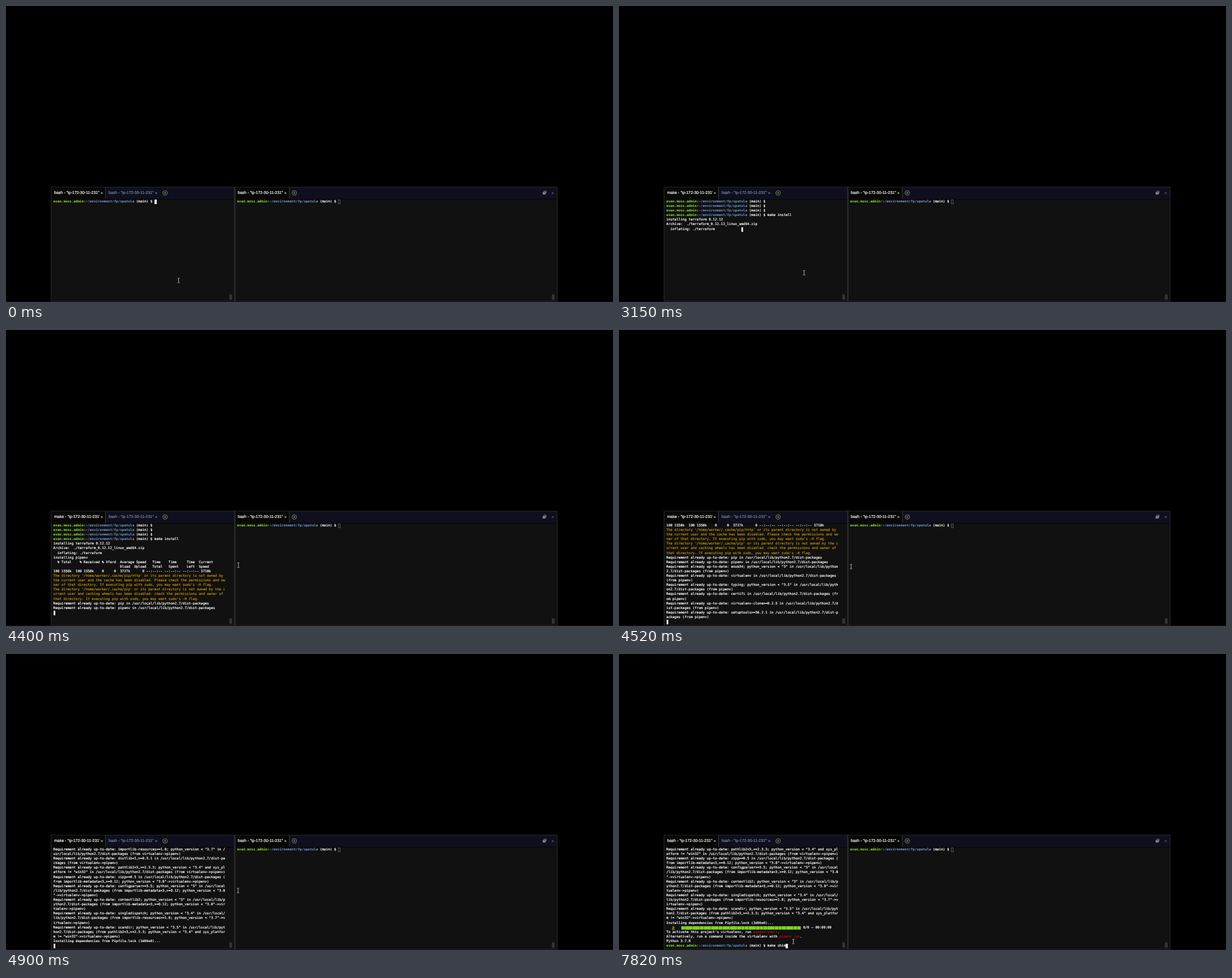
An HTML page that plays this animation: 1071 by 523 pixels, repeating every 8 s.

```html
<!DOCTYPE html>
<html lang="en">
<head>
<meta charset="utf-8">
<title>Terminal session</title>
<style>
  html, body { margin: 0; width: 100%; height: 100%; overflow: hidden; background: #000; }
  #stage { position: absolute; left: 0; top: 0; width: 1071px; height: 523px; overflow: hidden; text-rendering: geometricPrecision; }
  svg { position: absolute; left: 0; top: 0; }
  .tab { font: 7.03px "Liberation Sans", Arial, sans-serif; fill: #fff; stroke: #fff; stroke-width: .2px; }
  .idle { fill: #77899a; stroke: #77899a; }
  .stroke { fill: none; stroke-width: .9; }
  .term {
    position: absolute; top: 342px; margin: 0; color: #fff;
    font: 5.93px/8.095px "DejaVu Sans Mono", monospace;
    -webkit-text-stroke: .22px currentColor;
  }
  .row { position: relative; height: 8.095px; white-space: pre; }
  .user, .path, .bold { font-weight: bold; -webkit-text-stroke-width: 0; }
  .user { color: #8ae234; }
  .path { color: #6f9bdc; }
  .warn { color: #bd8a0a; }
  .red { color: #c00808; }
  .cursor { position: absolute; top: .4px; width: 3.6px; height: 7.6px; background: #f0f0f0; }
  .cursor.hollow { width: 4px; height: 8px; top: 0; background: none; border: 1px solid #555; box-sizing: border-box; }
  .bar {
    position: absolute; left: 26.4px; top: 1px; width: 211.2px; height: 6.4px;
    background: repeating-linear-gradient(90deg, #7ad321 0 5.9px, #4f8a1c 5.9px 6.6px);
  }
  .count { position: absolute; left: 241.4px; }
  .snake { left: 8.5px; top: .5px; }
</style>
</head>
<body>
<div id="stage">
  <svg width="1071" height="523" viewBox="0 0 1071 523">
    <defs>
      <clipPath id="titleClip"><rect x="85" y="322" width="80.2" height="16"/></clipPath>
      <linearGradient id="shade" x2="0" y2="1"><stop stop-color="#060606"/><stop offset="1" stop-color="#111"/></linearGradient>
      <path id="close" class="stroke" d="M-1.6-1.6 1.6 1.6M1.6-1.6-1.6 1.6"/>
      <g id="plus" class="stroke" stroke="#8f9f55"><circle r="4"/><path d="M-2 0H2M0-2V2"/></g>
    </defs>
    <rect x="79" y="319.5" width="894" height="203" fill="#2b2c30"/>
    <rect x="80" y="320.5" width="892" height="20" fill="#0f0f20"/>
    <rect x="80" y="340.5" width="892" height="181" fill="#111"/>
    <rect x="80" y="340.5" width="892" height="3.5" fill="url(#shade)"/>
    <rect x="80" y="320.5" width="95" height="20.5" fill="#080907"/>
    <rect x="405" y="320.5" width="94.5" height="20.5" fill="#080907"/>
    <path d="M175.5 320V340.5M500 320V340.5" stroke="#3a3d35" stroke-width="1"/>
    <rect id="splitter" x="402.5" y="319.5" width="2.5" height="202" fill="#2b2b2b"/>
    <rect y="522" width="1071" height="1" fill="#180d10"/>
    <g fill="#333"><rect x="394" y="509.5" width="5" height="9.5" rx="1"/><rect x="963" y="509.5" width="5" height="9.5" rx="1"/></g>
    <text id="title" class="tab" x="85" y="332.4" clip-path="url(#titleClip)"></text>
    <text class="tab idle" x="181" y="332.4">bash - "ip-172-30-11-231"</text>
    <text class="tab" x="409" y="332.4">bash - "ip-172-30-11-231"</text>
    <use href="#close" x="169" y="330.5" stroke="#ddd"/>
    <use href="#close" x="265" y="330.5" stroke="#8a949c"/>
    <use href="#close" x="493" y="330.5" stroke="#ddd"/>
    <use href="#close" x="964.8" y="330.5" stroke="#777"/>
    <use href="#plus" x="280.7" y="330.3"/>
    <use href="#plus" x="508.7" y="330.3"/>
    <g class="stroke" stroke="#999"><path d="M949 328.4V327.2H953V330.6H952"/><rect x="947.4" y="329.2" width="4" height="3.4" fill="#777"/></g>
  </svg>
  <div id="left" class="term" style="left:83.6px"></div>
  <div id="right" class="term" style="left:407.8px"></div>
  <svg width="1071" height="523" viewBox="0 0 1071 523">
    <path id="mouse" class="stroke" stroke="#c4c4c4" d="M-2-4H-.6L0-3.4.6-4H2M0-3.4V3.4M-2 4H-.6L0 3.4.6 4H2"/>
  </svg>
</div>
<script>
const LOOP = 8000, COLS = 85, ROWS = 22, CELL = 3.57;
const PROMPT = 'evan.moss.admin:~/environment/fp/spatula (main) $ ';
const LIB = '/usr/local/lib/python2.7/dist-packages';
const BAR = '\u2589';
const $ = id => document.getElementById(id);

const output = [];
const print = (time, text) => output.push({ time, text });
const type = (start, gap, text) => [...text].forEach((c, i) => print(start + i * gap, c));
const requirement = (name, from) =>
  `Requirement already up-to-date: ${name} in ${LIB}${from ? ` (from ${from})` : ''}\n`;
const python = v => `; python_version < "${v}"`;
const warning = (dir, what) =>
  `The directory '/home/worker/.cache/${dir}' or its parent directory is not owned by the current user and ${what} ` +
  `the permissions and owner of that directory. If executing pip with sudo, you may want sudo's -H flag.\n`;

print(0, PROMPT);
for (let i = 0; i < 3; i++) {
  print(60 + i * 96, '\n');
  print(108 + i * 96, PROMPT);
}
type(630, 60, 'ma');
type(850, 82.2, 'ke install');
print(2090, '\n');
print(2310, 'installing terraform 0.12.12\n');
print(2740, 'Archive:  ./terraform_0.12.12_linux_amd64.zip\n');
print(2820, '  inflating: ./terraform'.padEnd(37));
print(3390, '\ninstalling pipenv\n');
print(3540,
  '  % Total    % Received % Xferd  Average Speed   Time    Time     Time  Current\n' +
  '                                 Dload  Upload   Total   Spent    Left  Speed\n' +
  '  0     0    0     0    0     0      0      0 --:--:-- --:--:-- --:--:--     0');
print(4060, '\r100 1558k  100 1558k    0     0  3727k      0 --:--:-- --:--:-- --:--:-- 3718k\n');
print(4280, warning('pip/http', 'the cache has been disabled. Please check'));
print(4340, warning('pip', 'caching wheels has been disabled. check'));

const env = 'virtualenv->pipenv';
const meta = `importlib-metadata<3,>=0.12${python('3.8')}`;
const resources = `importlib-resources>=1.0${python('3.7')}`;
const pathlib = `pathlib2<3,>=2.3.3${python('3.4')} and sys_platform != "win32"`;
[['pip'], ['pipenv'],
 ['enum34' + python('3'), 'pipenv'],
 ['virtualenv', 'pipenv'],
 ['typing' + python('3.5'), 'pipenv'],
 ['certifi', 'pipenv'],
 ['virtualenv-clone>=0.2.5', 'pipenv'],
 ['setuptools>=36.2.1', 'pipenv'],
].forEach((r, i) => print(4380 + i * 20, requirement(...r)));
[['six<2,>=1.9.0', env],
 ['filelock<4,>=3.0.0', env],
 ['appdirs<2,>=1.4.3', env],
 [meta, env],
 [resources, env],
 ['distlib<1,>=0.3.1', env],
 [pathlib, env],
 ['zipp>=0.5', `${meta}->${env}`],
 ['configparser>=3.5' + python('3'), `${meta}->${env}`],
 ['contextlib2' + python('3'), `${meta}->${env}`],
 ['singledispatch' + python('3.4'), `${resources}->${env}`],
 ['scandir' + python('3.5'), `${pathlib}->${env}`],
].forEach((r, i) => print(4550 + 30 * Math.floor(i / 2), requirement(...r)));

print(4900, 'Installing dependencies from Pipfile.lock (3d06e0)...\n');
print(5500, BAR + '\n');
print(5590, "To activate this project's virtualenv, run pipenv shell.\n" +
  'Alternatively, run a command inside the virtualenv with pipenv run.\n');
print(5680, 'Python 3.7.0\n');
print(5750, PROMPT);
print(6890, 'm');
type(7090, 88, 'ake sh');
print(7690, 'i');
print(7820, 'm');

const progress =
  '<svg class="snake" width="8" height="8"><path d="M2 2.2H5V4L2.2 5.2V6.6H6.6" fill="none" stroke="#7f9f2a" stroke-width="1.4"/></svg>' +
  '<span class="bar"></span><span class="count">0/0 \u2014 00:00:00</span>';

function decorate(text) {
  if (text === BAR) return progress;
  return text.replace(/&/g, '&amp;').replace(/</g, '&lt;')
    .replace(/^([\w.]+)(:)(~\S+)/, '<span class="user">$1$2</span><span class="path">$3</span>')
    .replace(/pipenv (shell|run)(?=\.)/, '<span class="red">$&</span>');
}

function wrap(line) {
  const text = line.split('\r').pop();
  const style = /^The directory/.test(text) ? 'warn' : /^Installing/.test(text) ? 'bold' : '';
  return (text.match(new RegExp(`.{1,${COLS}}`, 'g')) || ['']).map(part => ({ part, style }));
}

function screen(text, hollow) {
  const rows = text.split('\n').flatMap(wrap).slice(-ROWS);
  return rows.map(({ part, style }, i) => {
    const cursor = i < rows.length - 1 ? '' :
      `<i class="cursor ${hollow ? 'hollow' : ''}" style="left:${part.length * CELL}px"></i>`;
    return `<div class="row ${style}">${decorate(part)}${cursor}</div>`;
  }).join('');
}

// time, x, y
const path = [
  [0, 304.5, 485], [2090, 304.5, 485], [2150, 305, 484.5], [2310, 307, 484], [2340, 310.5, 481.5],
  [2540, 310.5, 481.5], [2820, 321.5, 478], [3120, 321.5, 478], [3150, 326.5, 471.5],
  [3900, 405, 414], [4030, 405, 414], [4190, 411, 411], [4520, 409.5, 418], [5590, 409.5, 418],
  [6610, 220, 324], [6730, 307.5, 508], [LOOP, 307.5, 508]
];

function mouseAt(t) {
  const i = path.findIndex(p => p[0] > t);
  const [t0, x0, y0] = path[i - 1], [t1, x1, y1] = path[i];
  const k = (t - t0) / (t1 - t0);
  return [x0 + (x1 - x0) * k, y0 + (y1 - y0) * k];
}

let shown = '';
function draw(t) {
  const text = output.filter(o => o.time <= t).map(o => o.text).join('');
  const html = screen(text, t >= 6010 && t < 6730);
  if (html !== shown) $('left').innerHTML = shown = html;

  const title = (t >= 2690 && t < 7300 ? 'make' : 'bash') + ' - "ip-172-30-11-231"';
  if ($('title').textContent !== title) $('title').textContent = title;

  const [x, y] = mouseAt(t);
  const hidden = t >= 5590 && t < 6610;
  $('mouse').setAttribute('transform', `translate(${x} ${y})`);
  $('mouse').style.display = hidden ? 'none' : '';
  $('splitter').setAttribute('fill', !hidden && Math.abs(x - 404) < 4 ? '#3a3a3a' : '#2b2b2b');
}

$('right').innerHTML = screen(PROMPT, true);
const start = performance.now();
function tick() {
  draw((performance.now() - start) % LOOP);
  requestAnimationFrame(tick);
}
tick();
</script>
</body>
</html>
```
